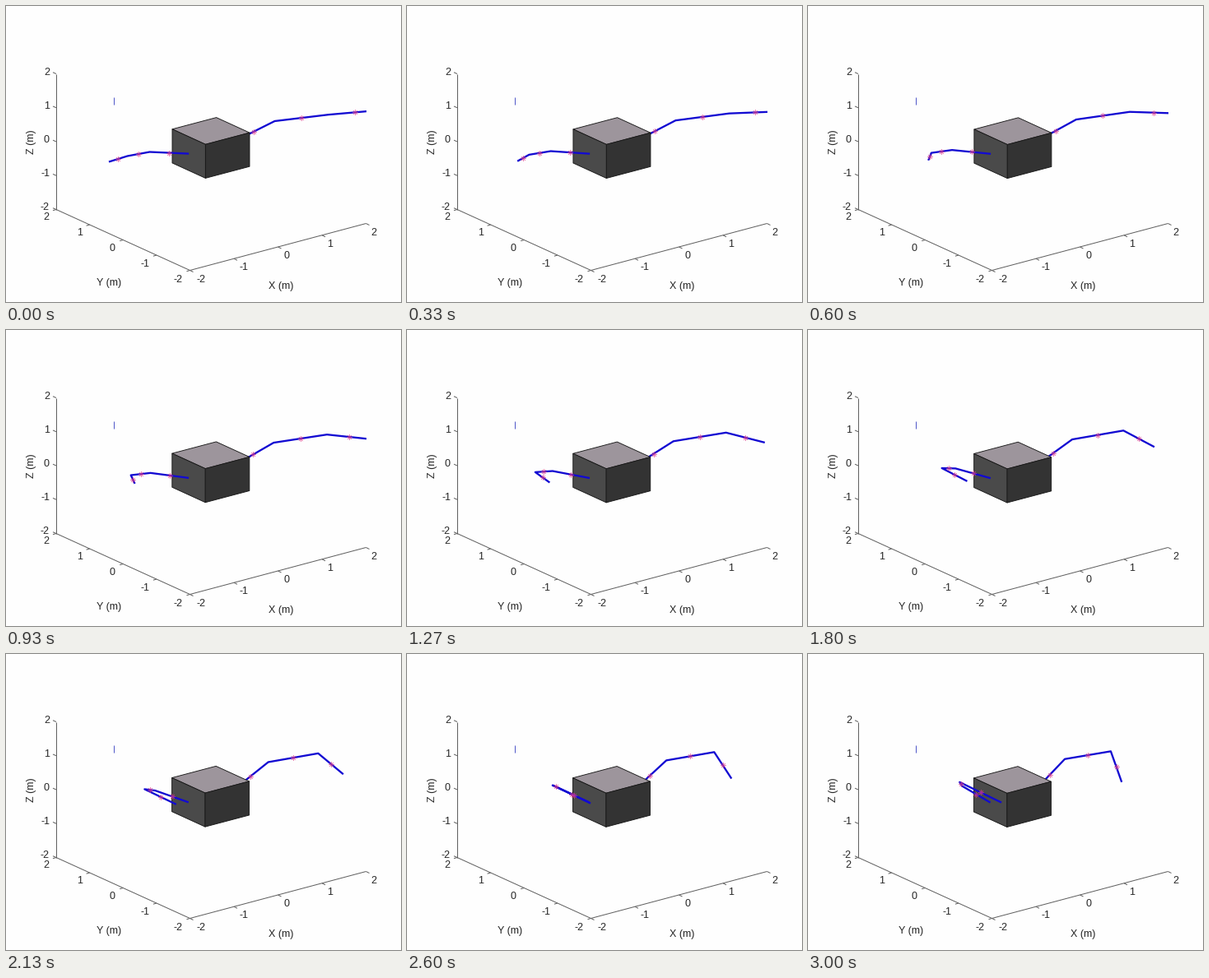
Write a matplotlib script that moves like this. It is 480 px wide and 360 px high and loops after 3.07 s.

```python
import numpy as np
import matplotlib.pyplot as plt
from matplotlib.animation import FuncAnimation
from matplotlib.patches import Polygon, Rectangle

W, H, DPI = 480, 360, 100
PX = 72 / DPI                      # one pixel in points
FRAMES, LOOP = 46, 3070

# Screen directions of one unit along each 3D axis
ORIGIN = np.array([248.5, 172.0])
EX, EY, EZ = np.array([[53.6, -14.2], [-40.4, -18.5], [0, -41.1]])
HALF = 0.5                         # half the side of the box
DRIFT = np.array([-0.6, 1.1])      # shift of the body over one loop

INK, TEXT, EDGE = "#606060", "#262626", "#181818"
BLUE, PINK = "#120ad2", "#e03c8c"

# Each joint swings along a parabola: start, halfway, end
RIGHT = [
    [(326, 139.5), (322, 133.7), (311, 127)],
    [(391, 131.7), (385.2, 123), (366.5, 117.7)],
    [(456, 126), (427.7, 139), (378.5, 156)],
]
LEFT = [
    [(174, 177), (177.5, 169.5), (187, 159.5)],
    [(147, 182), (158.5, 170), (185, 154.7)],
    [(124.5, 189), (183, 184.2), (236.5, 180)],
]


def project(x, y, z):
    return ORIGIN + x * EX + y * EY + z * EZ


def ease(t):
    return t - 0.025 * np.sin(2 * np.pi * t)


def parabola(points, t):
    a, b, c = np.array(points)
    return (1 - t) * (1 - 2 * t) * a + 4 * t * (1 - t) * b + t * (2 * t - 1) * c


fig = plt.figure(figsize=(W / DPI, H / DPI), dpi=DPI, facecolor="#fefefe")
ax = fig.add_axes([0, 0, 1, 1])
ax.set_xlim(-0.5, W - 0.5)
ax.set_ylim(H - 0.5, -0.5)
ax.axis("off")


def stroke(p, q, color=INK):
    ax.plot([p[0], q[0]], [p[1], q[1]], color=color, lw=PX,
            solid_capstyle="butt", zorder=1)


def label(x, y, s, va="center_baseline", **kw):
    ax.text(x, y, s, family="Liberation Sans", size=12.5 * PX, color=TEXT,
            ha="center", va=va, **kw)


def draw_axis(start, end, tick, first, last):
    """Axis from -2 to 2 with ticks and numbers between two label centres."""
    start, end, tick, first, last = map(np.array, (start, end, tick, first, last))
    stroke(start, end)
    for i in range(5):
        p = start + (end - start) * i / 4
        stroke(p, p + tick)
        label(*(first + (last - first) * i / 4), str(i - 2))


CORNER, BACK = (223, 321), (60.5, 247)
draw_axis(CORNER, (437, 264), (4, 2), (236, 330.7), (446, 273.7))
draw_axis(CORNER, BACK, (-4, 1.2), (209, 330.7), (48.5, 255.5))
draw_axis(BACK, (60.5, 82), (-4, -1.8), (47, 243.5), (49.5, 78.7))
label(334, 339.3, "X (m)")
label(124.7, 334.7, "Y (m)")
label(30.5, 165, "Z (m)", va="center", rotation=90)
stroke((130.6, 110.5), (130.6, 119.5), "#5058c8")


def make_face(color, corners):
    pts = np.array([project(*c) for c in corners])
    face = Polygon(pts, facecolor=color, edgecolor=EDGE, lw=0.9 * PX,
                   joinstyle="round", zorder=4)
    ax.add_patch(face)
    return face, pts


ring = HALF * np.array([(-1, -1), (1, -1), (1, 1), (-1, 1)])
box = [
    make_face("#9d959c", [(u, v, HALF) for u, v in ring]),
    make_face("#4a4a4a", [(-HALF, u, v) for u, v in ring]),
    make_face("#333333", [(u, -HALF, v) for u, v in ring]),
]

clip = Rectangle((0, 0), 437, H, transform=ax.transData)


def make_arm(zorder):
    line, = ax.plot([], [], color=BLUE, lw=2.3 * PX, zorder=zorder,
                    solid_capstyle="butt", solid_joinstyle="round")
    stars, = ax.plot([], [], ls="none", marker=(8, 2, 0), ms=6.5 * PX,
                     mec=PINK, mew=0.7 * PX, alpha=0.65, zorder=zorder + 0.5)
    line.set_clip_path(clip)
    return line, stars


arms = [
    (RIGHT, project(HALF, 0, 0), make_arm(2)),    # behind the box
    (LEFT, project(-HALF, 0, 0), make_arm(6)),    # in front of it
]


def update(i):
    t = i / (FRAMES - 1)
    for face, pts in box:
        face.set_xy(pts + DRIFT * t)
    for paths, base, (line, stars) in arms:
        p = np.array([base + DRIFT * t, *(parabola(j, ease(t)) for j in paths)])
        mid = (p[1:] + p[:-1]) / 2
        line.set_data(*p.T)
        stars.set_data(*mid.T)
    return []


anim = FuncAnimation(fig, update, frames=FRAMES, interval=LOOP / FRAMES,
                     init_func=lambda: update(0), repeat=True, repeat_delay=0)
plt.show()
```
